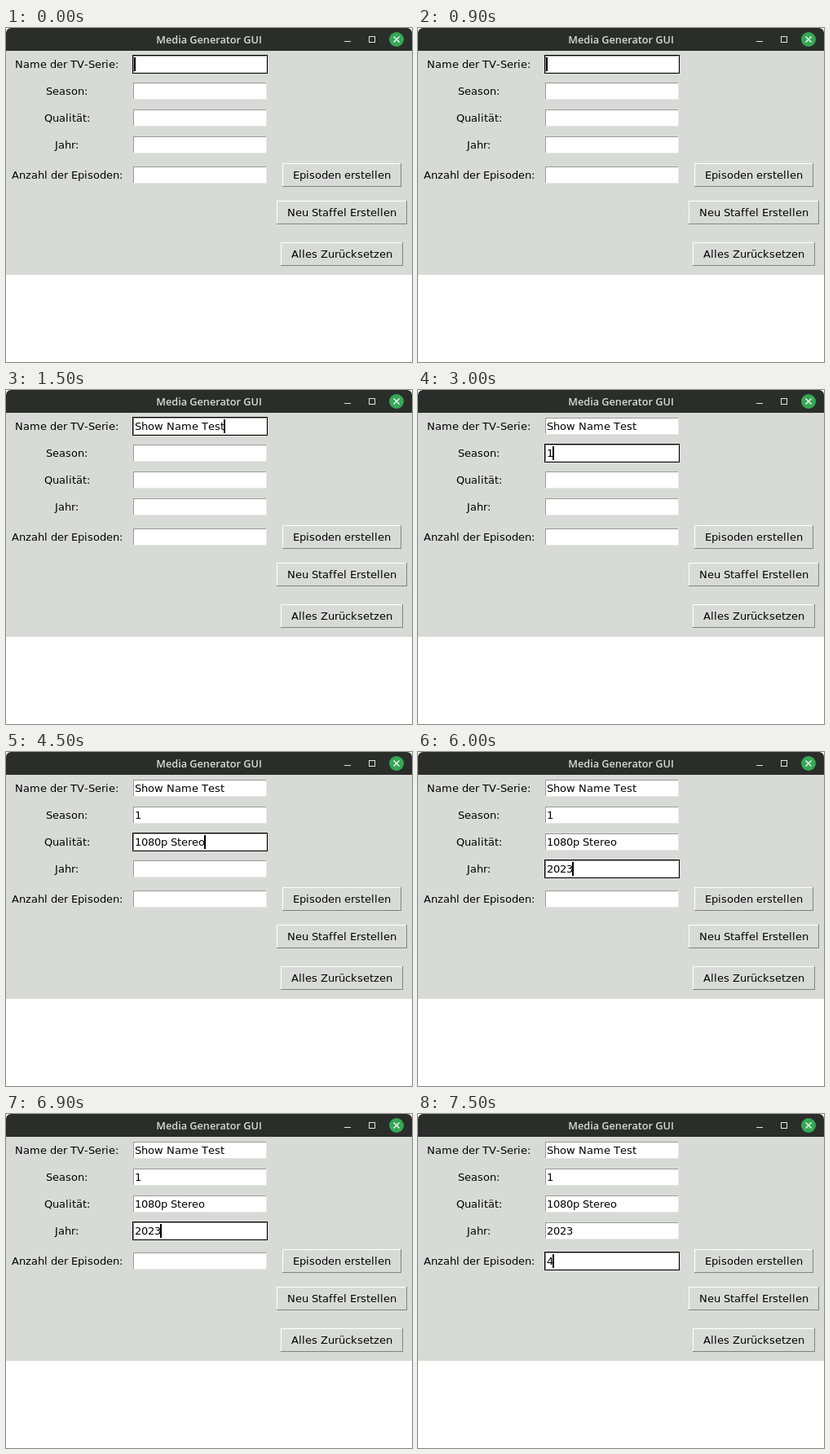
An HTML page with a canvas for the animation above (8 s loop, 498x410 px).

```html
<!DOCTYPE html>
<html lang="de">
<head>
<meta charset="utf-8">
<title>Media Generator GUI</title>
<style>
  html, body { margin: 0; width: 100%; height: 100%; overflow: hidden; background: #fff; }
  canvas { display: block; }
</style>
</head>
<body>
<canvas id="stage" width="498" height="410"></canvas>
<script>
const ctx = document.getElementById('stage').getContext('2d');
const LOOP = 8000, STEP = 1500;
const PANEL = '#d8dad8';
const FONT = '13px "DejaVu Sans", sans-serif';

const fields = [
  { label: 'Name der TV-Serie:', y: 33, value: 'Show Name Test' },
  { label: 'Season:', y: 66, value: '1' },
  { label: 'Qualität:', y: 99, value: '1080p Stereo' },
  { label: 'Jahr:', y: 132, value: '2023' },
  { label: 'Anzahl der Episoden:', y: 169, value: '4' }
];
const buttons = [
  { label: 'Episoden erstellen', y: 166 },
  { label: 'Neu Staffel Erstellen', y: 212 },
  { label: 'Alles Zurücksetzen', y: 263 }
];

function rect(x, y, w, h, color) {
  ctx.fillStyle = color;
  ctx.fillRect(x, y, w, h);
}

// The toolkit advances every glyph by whole pixels, without kerning.
const advance = ch => Math.round(ctx.measureText(ch).width);
const textWidth = text => [...text].reduce((sum, ch) => sum + advance(ch), 0);

function drawText(text, x, baseline) {
  ctx.fillStyle = '#000';
  for (const ch of text) {
    ctx.fillText(ch, x, baseline);
    x += advance(ch);
  }
}

function bevel(x, y, w, h, topLeft, bottomRight, fill) {
  rect(x, y, w, h, bottomRight);
  rect(x, y, w - 1, h - 1, topLeft);
  rect(x + 1, y + 1, w - 2, h - 2, fill);
}

function drawTitleBar() {
  ctx.fillStyle = '#2b2d2b';
  ctx.beginPath();
  ctx.roundRect(0, 0, 498, 28, [6, 6, 0, 0]);
  ctx.fill();

  ctx.font = '600 12.7px "Open Sans", "Noto Sans", sans-serif';
  ctx.textAlign = 'center';
  ctx.fillStyle = '#dadada';
  ctx.fillText('Media Generator GUI', 249, 19);
  ctx.textAlign = 'left';

  rect(415, 16, 8, 1, '#e4e4e4');
  ctx.strokeStyle = '#e4e4e4';
  ctx.lineWidth = 1;
  ctx.strokeRect(445.5, 10.5, 7, 7);

  ctx.fillStyle = '#35a854';
  ctx.beginPath();
  ctx.arc(479, 14, 9, 0, 2 * Math.PI);
  ctx.fill();
  ctx.strokeStyle = '#fff';
  ctx.lineWidth = 1.3;
  ctx.beginPath();
  ctx.moveTo(475.5, 10.5);
  ctx.lineTo(482.5, 17.5);
  ctx.moveTo(482.5, 10.5);
  ctx.lineTo(475.5, 17.5);
  ctx.stroke();
}

function drawField({ label, y, value }, filled, focused) {
  const baseline = y + 16;
  const text = filled ? value : '';
  drawText(label, Math.floor(75 - textWidth(label) / 2), baseline);
  if (focused) rect(155, y, 166, 23, '#000');
  bevel(156, y + 1, 164, 21, '#999', '#e6e6e6', '#fff');
  if (focused) rect(157 + textWidth(text), y + 3, 2, 17, '#000');
  drawText(text, 158, baseline);
}

function drawButton({ label, y }) {
  const width = textWidth(label);
  const x = 412 - width / 2;
  bevel(x - 13, y, width + 26, 29, '#fff', '#828282', PANEL);
  drawText(label, x, y + 19);
}

function draw(step) {
  rect(0, 0, 498, 410, '#fff');
  drawTitleBar();
  rect(0, 28, 498, 275, PANEL);
  ctx.font = FONT;
  const active = Math.max(0, step - 1);
  fields.forEach((field, i) => drawField(field, i < step, i === active));
  buttons.forEach(drawButton);
}

const start = performance.now();
function tick() {
  draw(Math.floor((performance.now() - start) % LOOP / STEP));
  requestAnimationFrame(tick);
}
tick();
</script>
</body>
</html>
```
